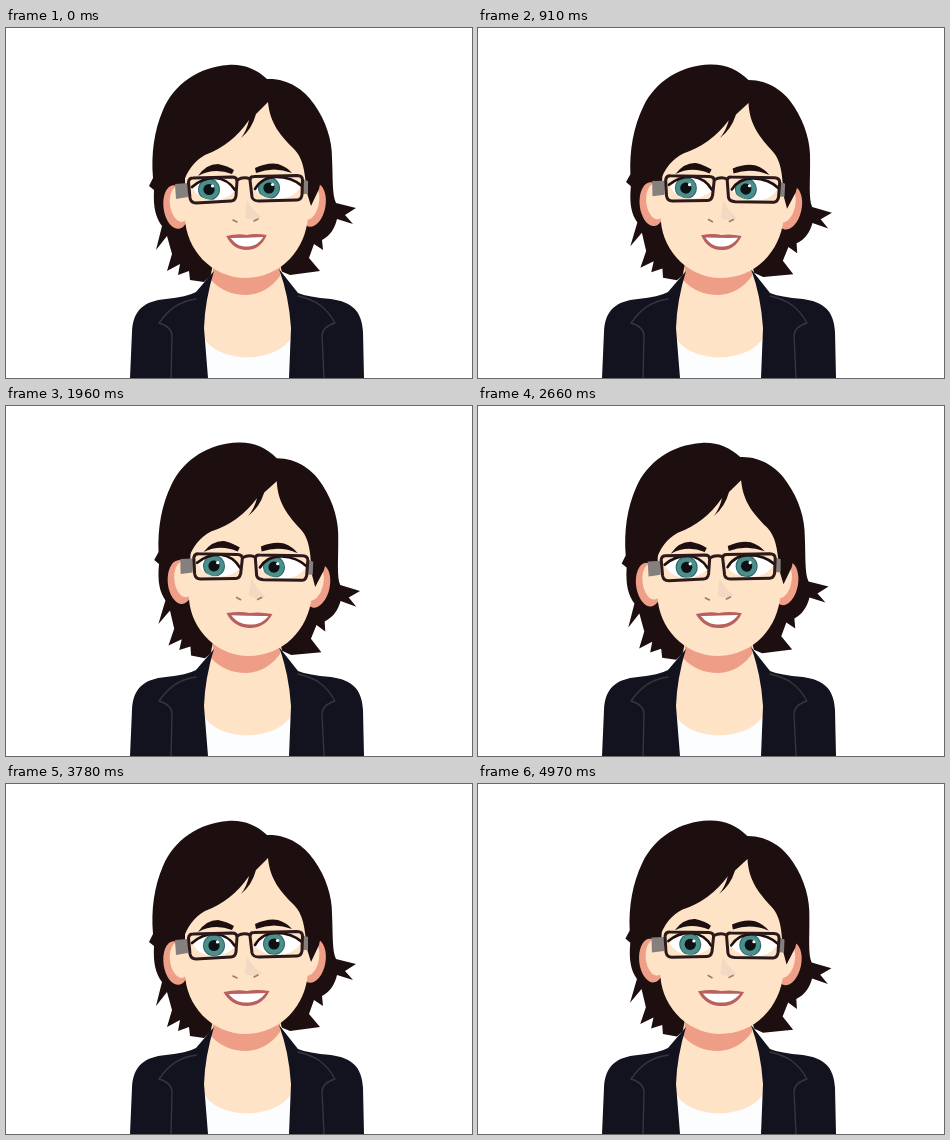
An HTML page for the animation above (5.04 s loop, 466 px wide and 350 px high).

```html
<!DOCTYPE html>
<html lang="en">
<head>
<meta charset="utf-8">
<title>Talking portrait</title>
<style>
  html, body { margin: 0; width: 100%; height: 100%; overflow: hidden; background: #fff; }
  svg { display: block; width: 466px; height: 350px; }
  .line { fill: none; stroke-linecap: round; stroke-linejoin: round; }
  .hair { fill: #1d0e0f; }
  .skin { fill: #fee3c6; }
</style>
</head>
<body>
<svg viewBox="0 0 466 350">
  <defs>
    <path id="leftWhite" d="M187 161Q196 150 209 150Q223 151 229 163Q220 172 207 172Q194 172 187 161Z"/>
    <path id="rightWhite" d="M249 162Q256 149 270 149Q286 149 295 159Q287 171 272 171Q257 171 249 162Z"/>
    <clipPath id="leftEye"><use href="#leftWhite"/></clipPath>
    <clipPath id="rightEye"><use href="#rightWhite"/></clipPath>
    <g id="iris">
      <circle r="11" fill="#2f6668"/>
      <circle r="10" fill="#4b8f8c"/>
      <circle r="5.6" fill="#0d1114"/>
      <circle cx="3.5" cy="-3.5" r="1.6" fill="#fff"/>
    </g>
  </defs>

  <!-- hair behind the face -->
  <g class="head">
    <path class="hair" d="M222 37C193 39 168 56 157 82C148 103 145 126 147 150L143 158L148 162C147 180 150 190 156 198L150 222L161 208L166 226L161 243L174 236L172 247L183 243L184 252L198 254L211 242H272L284 247L314 243L303 230L308 216L317 222L316 212C324 208 329 200 331 191L347 196L339 187L350 180L330 175C326 167 327 150 326 130C326 112 320 93 308 76C298 61 281 50 261 51C250 41 238 36 222 37Z"/>
  </g>

  <!-- body -->
  <path class="skin" d="M207 236L196 290V350H287V290L274 236Z"/>
  <path d="M207 244Q205 249 205 252Q219 267 240 267Q261 266 274 248V238H207Z" fill="#ee9d86"/>
  <path d="M196 306C208 337 274 337 287 306V350H196Z" fill="#fcfdfe"/>
  <g fill="#12131f">
    <path d="M208 243L190 264Q181 269 160 271C138 273 127 282 126 304L124 350H202L198 300Q199 272 208 243Z"/>
    <path d="M273 241L292 265Q302 269 325 271C346 274 356 283 357 304L358 350H283L285 300Q283 268 273 241Z"/>
  </g>
  <g class="line" stroke="#34353d" stroke-width="1.4">
    <path d="M190 271C172 274 163 281 153 295Q166 299 166 308L165 350"/>
    <path d="M292 268C310 272 320 279 329 295Q316 299 316 308L318 350"/>
  </g>

  <!-- face -->
  <g class="head">
    <g fill="#ef9f87">
      <ellipse cx="170" cy="179" rx="12.5" ry="22" transform="rotate(-8 170 179)"/>
      <ellipse cx="307" cy="177" rx="12.5" ry="22" transform="rotate(10 307 177)"/>
    </g>
    <g class="skin">
      <ellipse cx="174" cy="176" rx="10" ry="18" transform="rotate(-8 174 176)"/>
      <ellipse cx="303" cy="174" rx="10" ry="18" transform="rotate(10 303 174)"/>
    </g>
    <path class="skin" d="M179 125V190C180 221 205 250 240 250C276 249 300 221 302 188L303 120L266 68L215 85Z"/>
    <path class="hair" d="M168 157L177 156C181 143 188 133 199 127Q226 117 243 92Q241 102 235 110Q246 101 250 86L262 74C264 96 275 108 288 121C299 132 299 150 301 165L305 178L313 161L322 120L295 66L240 46L185 65L155 120V157Z"/>

    <path d="M241 172L239 190Q249 194 256 189Q247 184 241 172Z" fill="#f2d9c3"/>
    <g class="line" stroke="#a97664" stroke-width="1.6">
      <path d="M227 192L231 194M248 193L252 191"/>
    </g>

    <g fill="#fff"><use href="#leftWhite"/><use href="#rightWhite"/></g>
    <g clip-path="url(#leftEye)"><use class="iris" href="#iris" data-x="208" data-y="161.5"/></g>
    <g clip-path="url(#rightEye)"><use class="iris" href="#iris" data-x="268" data-y="160"/></g>
    <g class="line" stroke="#1d0e0f" stroke-width="2.6">
      <path d="M186 159Q196 150 209 150Q222 151 229 162"/>
      <path d="M249 161Q256 149 270 149Q286 149 296 158"/>
    </g>

    <g class="hair">
      <path d="M192 148Q200 136 212 136Q222 138 228 142L226 146Q208 139 192 148Z"/>
      <path d="M249 140Q262 134 272 136Q281 139 286 145Q268 138 250 145Z"/>
    </g>

    <g fill="#85807d">
      <path d="M169 156L182 155V169L170 171Z"/>
      <path d="M296 151L302 153V166L296 166Z"/>
    </g>
    <g class="line" stroke="#2b191b" stroke-width="3">
      <path d="M182.5 154Q183 150 187 150L226 149Q231 149 231 153L230 168Q229 173 225 173L190 175Q185 175 184 170Z"/>
      <path d="M244 152Q244 148.500 248 148.500L291 147.500Q296.500 147.500 296.500 152L296 167Q295 172 291 172L253 173Q247 173 246 169Z"/>
      <path d="M231 152Q238 148 244 151"/>
    </g>

    <g id="mouth">
      <path d="M-23-6Q-9-9 0-7Q10-9 23-7C18 4 9 8 0 8C-10 8-18 3-23-6Z" fill="#b85f60"/>
      <path d="M-18-4Q0-4 19-5C14 2 8 4.500 0 4.500C-8 4.500-13 2-18-4Z" fill="#fff"/>
    </g>
  </g>
</svg>
<script>
  const LOOP = 5040, STEP = 70;
  const heads = document.querySelectorAll('.head');
  const irises = document.querySelectorAll('.iris');
  const mouth = document.getElementById('mouth');

  // Smooth 0..1 ramp between two times
  function ease(t, from, to) {
    const p = Math.min(1, Math.max(0, (t - from) / (to - from)));
    return p * p * (3 - 2 * p);
  }

  function draw() {
    const t = Math.floor(performance.now() % LOOP / STEP) * STEP;
    const tilt = ease(t, 100, 1000) - ease(t, 2000, 2850) + ease(t, 4400, 5150);
    const gaze = -5 * (1 - ease(t, 2050, 2500));
    const smile = 0.88 + 0.12 * ease(t, 1000, 1800);

    for (const head of heads) head.setAttribute('transform', `rotate(${2.5 * tilt} 240 275)`);
    for (const iris of irises) {
      const x = +iris.dataset.x + gaze;
      iris.setAttribute('transform', `translate(${x} ${iris.dataset.y})`);
    }
    mouth.setAttribute('transform', `translate(240.5 214) scale(${smile} 1)`);
    requestAnimationFrame(draw);
  }
  draw();
</script>
</body>
</html>
```
